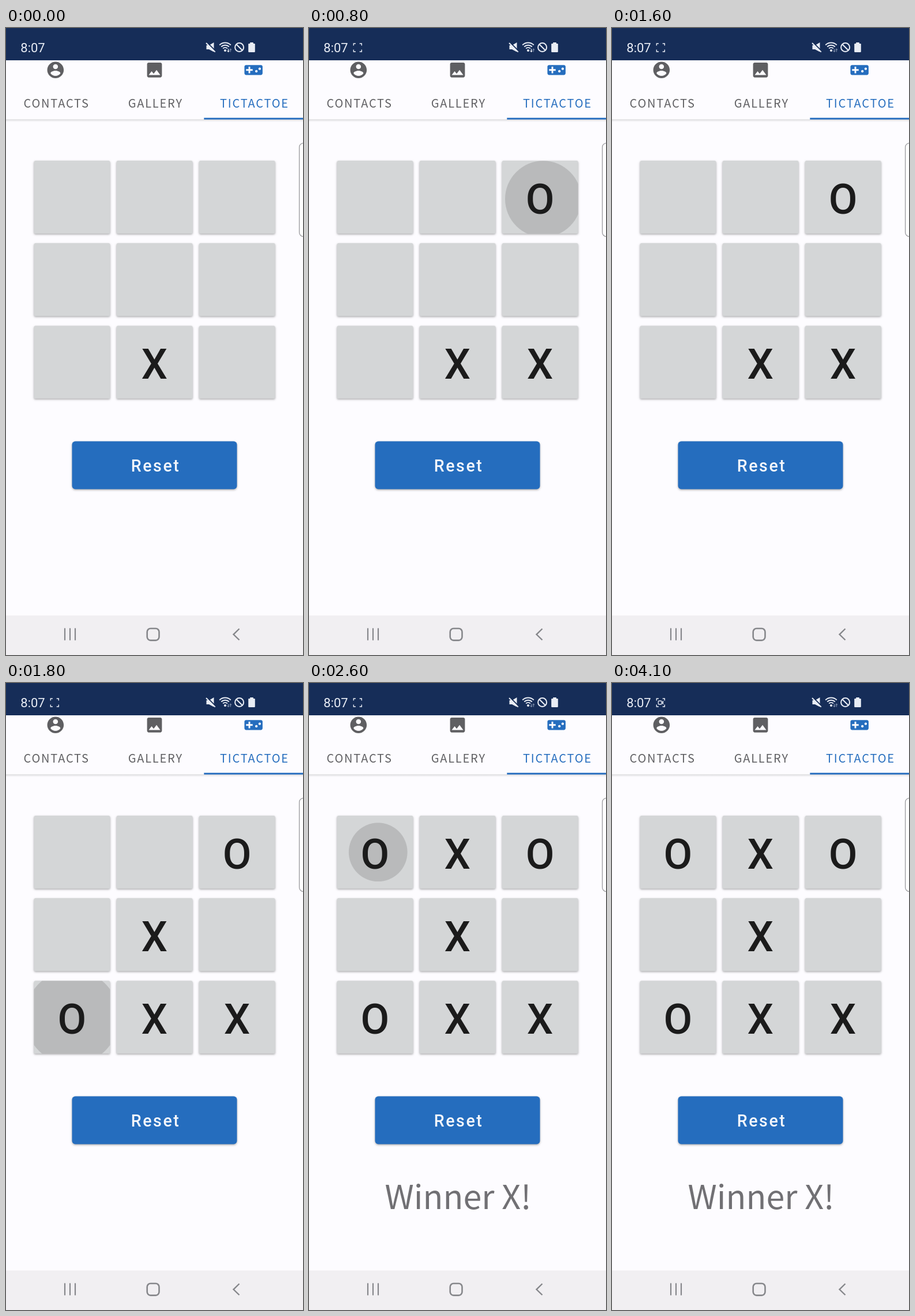
An HTML page with a canvas that plays this animation: 515x1087 px, repeating every 4.5 s.

```html
<!DOCTYPE html>
<html lang="en">
<head>
<meta charset="utf-8">
<title>Tic-tac-toe</title>
<style>
html, body { margin: 0; width: 100%; height: 100%; overflow: hidden; background: #fdfcff; }
canvas { display: block; width: 515px; height: 1087px; }
</style>
</head>
<body>
<canvas id="stage" width="515" height="1087"></canvas>
<script>
const ctx = document.getElementById('stage').getContext('2d');
const LOOP = 4500, STEP = 100;
const ROBOTO = 'Roboto, sans-serif';
const NOTO = '"Noto Sans CJK KR", "Noto Sans CJK JP", "Noto Sans CJK SC", "Noto Sans CJK", sans-serif';
const BLUE = '#256dbe', GREY = '#5f5f62', STATUS = '#162d58', LIGHT = '#e9edf5', PAGE = '#fdfcff', NAV = '#86878b';
const CELL = { x: 48.5, y: 230, w: 132, h: 126.4, pitch: 143.1 };

// Each mark appears at `at`; a tapped cell also has a ripple that grows, then fades.
const marks = [
  { col: 1, row: 2, text: 'X', at: 0 },
  { col: 2, row: 2, text: 'X', at: 100, ripple: { grow: 121, fade: 443, dx: 0, dy: 0 } },
  { col: 2, row: 0, text: 'O', at: 700, ripple: { grow: 721, fade: 1043, dx: 10.9, dy: 6.5 } },
  { col: 1, row: 1, text: 'X', at: 1700 },
  { col: 0, row: 2, text: 'O', at: 1700, ripple: { grow: 1683, fade: 1943, dx: 0, dy: 0 } },
  { col: 1, row: 0, text: 'X', at: 2600 },
  { col: 0, row: 0, text: 'O', at: 2600, ripple: { grow: 2546, fade: 2943, dx: 6.7, dy: 0 } }
];

const icons = {
  person: new Path2D('M12 2C6.48 2 2 6.48 2 12s4.48 10 10 10 10-4.48 10-10S17.52 2 12 2zm0 3c1.66 0 3 1.34 3 3s-1.34 3-3 3-3-1.34-3-3 1.34-3 3-3zm0 14.2c-2.5 0-4.71-1.28-6-3.22.03-1.99 4-3.08 6-3.08 1.99 0 5.97 1.09 6 3.08-1.29 1.94-3.5 3.22-6 3.22z'),
  picture: new Path2D('M21 19V5c0-1.1-.9-2-2-2H5c-1.1 0-2 .9-2 2v14c0 1.1.9 2 2 2h14c1.1 0 2-.9 2-2zM8.5 13.5l2.5 3.01L14.5 12l4.5 6H5l3.5-4.5z'),
  gamepad: new Path2D('M21 6H3c-1.1 0-2 .9-2 2v8c0 1.1.9 2 2 2h18c1.1 0 2-.9 2-2V8c0-1.1-.9-2-2-2zm-10 7H8v3H6v-3H3v-2h3V8h2v3h3v2zm4.5 2c-.83 0-1.5-.67-1.5-1.5s.67-1.5 1.5-1.5 1.5.67 1.5 1.5-.67 1.5-1.5 1.5zm4-3c-.83 0-1.5-.67-1.5-1.5S18.67 9 19.5 9s1.5.67 1.5 1.5-.67 1.5-1.5 1.5z')
};

const clamp = v => Math.max(0, Math.min(1, v));

// cubic-bezier(0.4, 0, 0.2, 1)
function fastOutSlowIn(x) {
  let lo = 0, hi = 1;
  for (let i = 0; i < 20; i++) {
    const u = (lo + hi) / 2, v = 1 - u;
    if (1.2 * v * v * u + 0.6 * v * u * u + u ** 3 < x) lo = u; else hi = u;
  }
  return 3 * (1 - lo) * lo * lo + lo ** 3;
}

function rect(x, y, w, h, color) {
  ctx.fillStyle = color;
  ctx.fillRect(x, y, w, h);
}

function roundRect(x, y, w, h, r) {
  ctx.beginPath();
  ctx.roundRect(x, y, w, h, r);
}

function line(points, color, width) {
  ctx.beginPath();
  points.forEach(([x, y]) => ctx.lineTo(x, y));
  ctx.strokeStyle = color;
  ctx.lineWidth = width;
  ctx.stroke();
}

function polygon(points, color) {
  ctx.beginPath();
  points.forEach(([x, y]) => ctx.lineTo(x, y));
  ctx.fillStyle = color;
  ctx.fill();
}

function text(str, x, y, font, color, spacing = 0, align = 'center') {
  ctx.font = font;
  ctx.letterSpacing = spacing + 'px';
  ctx.textAlign = align;
  ctx.fillStyle = color;
  ctx.fillText(str, align === 'center' ? x + spacing / 2 : x, y);
}

function raised(x, y, w, h, r, color) {
  ctx.save();
  ctx.shadowColor = 'rgba(0,0,0,.32)';
  ctx.shadowBlur = 3.5;
  ctx.shadowOffsetY = 1.5;
  ctx.fillStyle = color;
  roundRect(x, y, w, h, r);
  ctx.fill();
  ctx.restore();
}

function drawRecorder(t) {
  if (t < 200) return;
  for (const sx of [-1, 1]) for (const sy of [-1, 1]) {
    const x = 84.3 + sx * 7, y = 34 + sy * 7;
    line([[x - sx * 3.6, y], [x, y], [x, y - sy * 3.6]], LIGHT, 1.4);
  }
  if (t < 4000) return;
  ctx.globalAlpha = t < 4100 ? 0.5 : 1;
  roundRect(80.3, 31, 5.8, 6, 1.2);
  ctx.strokeStyle = LIGHT;
  ctx.lineWidth = 1.3;
  ctx.stroke();
  line([[86.2, 34], [88.6, 31.8], [88.6, 36.2], [86.2, 34]], LIGHT, 1.1);
  ctx.globalAlpha = 1;
}

function drawStatus(t) {
  rect(0, 0, 515, 56, STATUS);
  text('8:07', 25.3, 42, '22px ' + ROBOTO, LIGHT, 0, 'left');
  drawRecorder(t);

  // Muted speaker
  polygon([[347.5, 30], [352, 30], [360.5, 25], [360.5, 41.5], [352, 37], [347.5, 37]], LIGHT);
  line([[348, 24.5], [364, 40.5]], STATUS, 2);
  line([[347, 26], [362.7, 41.7]], LIGHT, 1.9);

  // Wi-Fi with traffic arrows
  ctx.strokeStyle = LIGHT;
  ctx.lineWidth = 1.9;
  for (const r of [13.8, 9.6, 5.4]) {
    ctx.beginPath();
    ctx.arc(380, 39.3, r, -Math.PI * 0.75, -Math.PI * 0.25);
    ctx.stroke();
  }
  ctx.beginPath();
  ctx.arc(380, 39, 2.1, 0, Math.PI * 2);
  ctx.fillStyle = LIGHT;
  ctx.fill();
  const dim = '#7787a5';
  line([[385.5, 36], [385.5, 41.2]], t < 1300 ? LIGHT : dim, 1.2);
  line([[383.7, 39.4], [385.5, 41.4], [387.3, 39.4]], t < 1300 ? LIGHT : dim, 1.1);
  line([[389.3, 41.5], [389.3, 36.3]], dim, 1.2);
  line([[387.6, 38.1], [389.3, 36.1], [391, 38.1]], dim, 1.1);

  // Blocked sign
  ctx.beginPath();
  ctx.arc(404.6, 33.5, 7.5, 0, Math.PI * 2);
  ctx.strokeStyle = LIGHT;
  ctx.lineWidth = 2;
  ctx.stroke();
  line([[399.3, 28.2], [409.9, 38.8]], LIGHT, 2);

  // Battery
  ctx.fillStyle = LIGHT;
  roundRect(420.2, 27, 11.6, 15, 1.2);
  ctx.fill();
  rect(423.2, 25, 5.6, 3, LIGHT);
}

function drawTabs() {
  const shade = ctx.createLinearGradient(0, 158, 0, 163);
  shade.addColorStop(0, 'rgba(0,0,0,.2)');
  shade.addColorStop(0.4, 'rgba(0,0,0,.08)');
  shade.addColorStop(1, 'rgba(0,0,0,0)');
  rect(0, 158.5, 515, 4.5, shade);
  const tabs = [['CONTACTS', 'person', GREY], ['GALLERY', 'picture', GREY], ['TICTACTOE', 'gamepad', BLUE]];
  tabs.forEach(([label, icon, color], i) => {
    const cx = 515 * (i + 0.5) / 3;
    ctx.save();
    ctx.translate(cx, 72.8);
    ctx.scale(1.4306, 1.4306);
    ctx.translate(-12, -12);
    ctx.fillStyle = color;
    ctx.fill(icons[icon]);
    ctx.restore();
    text(label, cx + 0.9, 138, '20px ' + NOTO, color, 1.79);
  });
  rect(343.3, 155.7, 172, 2.9, BLUE);
}

function drawHandle() {
  roundRect(508.6, 199.6, 20, 162, 7);
  ctx.fillStyle = '#fefefe';
  ctx.fill();
  ctx.strokeStyle = '#98989d';
  ctx.lineWidth = 1.3;
  ctx.stroke();
}

function drawRipple(x, y, r, t) {
  const fade = clamp((t - r.fade) / 150);
  if (fade === 1) return;
  const p = fastOutSlowIn(clamp((t - r.grow) / 225));
  const from = 0.3 * CELL.w, full = Math.hypot(CELL.w, CELL.h) / 2 + 1;
  ctx.save();
  roundRect(x, y, CELL.w, CELL.h, 2.9);
  ctx.clip();
  ctx.beginPath();
  ctx.arc(x + CELL.w / 2 + r.dx * (1 - p), y + CELL.h / 2 + r.dy * (1 - p),
    from + (full - from) * p, 0, Math.PI * 2);
  ctx.fillStyle = `rgba(0,0,0,${0.13 * (1 - fade)})`;
  ctx.fill();
  ctx.restore();
}

function drawBoard(t) {
  for (let i = 0; i < 9; i++) {
    raised(CELL.x + (i % 3) * CELL.pitch, CELL.y + Math.floor(i / 3) * CELL.pitch, CELL.w, CELL.h, 2.9, '#d4d6d7');
  }
  for (const m of marks) {
    if (t < m.at) continue;
    const x = CELL.x + m.col * CELL.pitch, y = CELL.y + m.row * CELL.pitch;
    if (m.ripple) drawRipple(x, y, m.ripple, t);
    text(m.text, x + CELL.w / 2 - 0.2, y + 91.6, '500 72px ' + ROBOTO, '#1b1b1b');
  }
  raised(114.5, 716.5, 286, 83, 5.7, BLUE);
  text('Reset', 258.3, 769, '500 28.6px ' + ROBOTO, '#f3f6fb', 2.55);
  if (t >= 2600) text('Winner X!', 258.5, 911.5, '57.3px ' + NOTO, '#717074');
}

function drawNav() {
  rect(0, 1018.5, 515, 68.5, '#f1eff2');
  for (const x of [102, 111, 120]) line([[x, 1040.5], [x, 1061.5]], NAV, 2.2);
  roundRect(244.7, 1041, 20.8, 20.6, 6);
  ctx.lineWidth = 2.6;
  ctx.stroke();
  line([[404.5, 1041.5], [394.5, 1051.3], [404.5, 1061]], NAV, 2.4);
}

const start = performance.now();
function frame(now) {
  const t = Math.floor((Math.max(0, now - start) % LOOP) / STEP) * STEP;
  rect(0, 0, 515, 1087, PAGE);
  drawTabs();
  drawStatus(t);
  drawBoard(t);
  drawHandle();
  drawNav();
  requestAnimationFrame(frame);
}
frame(start);
</script>
</body>
</html>
```
